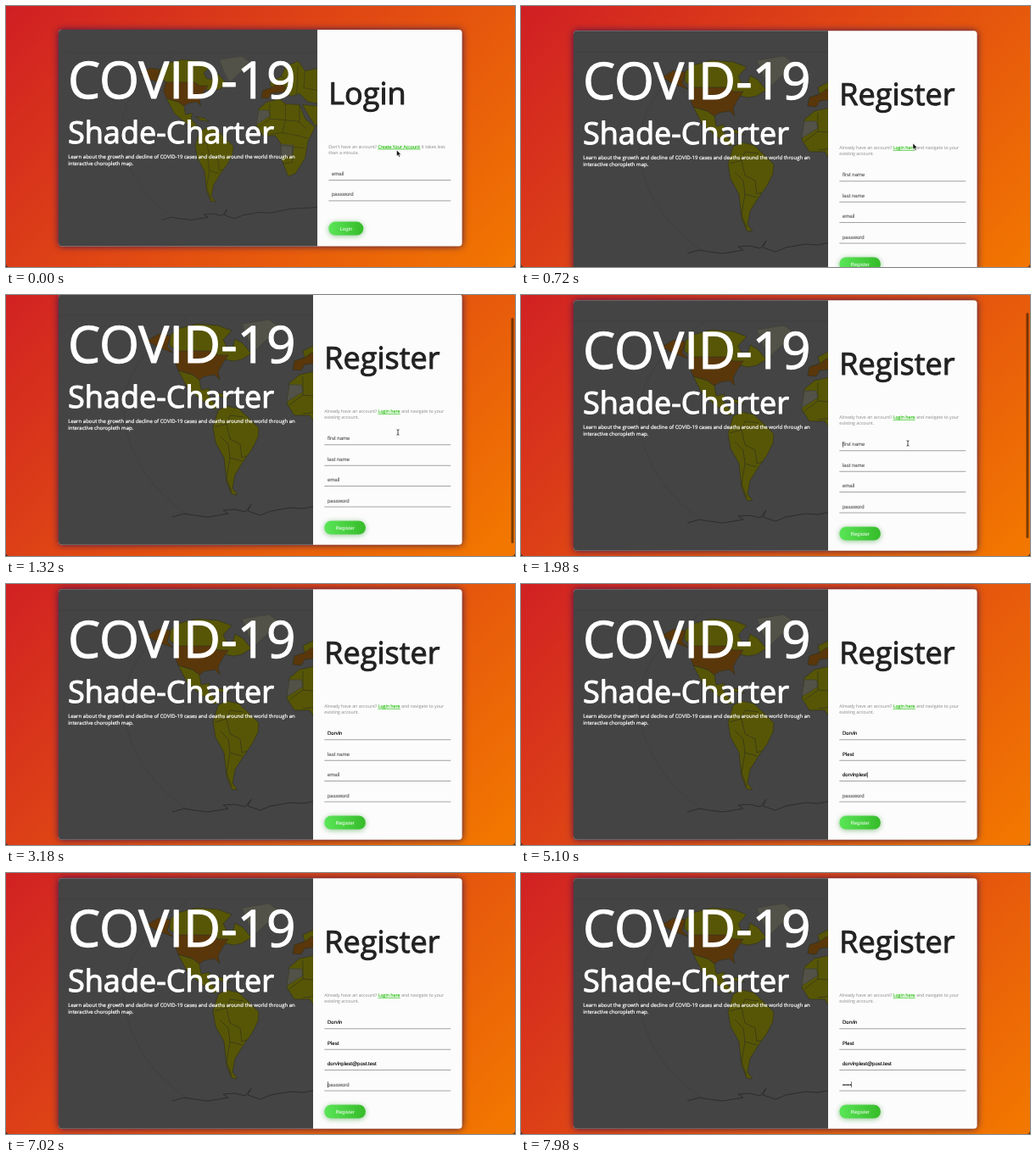
An HTML page that plays this animation: 600 px wide and 308 px high, repeating every 8000 ms.

```html
<!DOCTYPE html>
<html lang="en">
<head>
<meta charset="utf-8">
<title>Register</title>
<style>
  html, body { margin: 0; width: 100%; height: 100%; overflow: hidden; background: #3a2420; }
  svg { display: block; width: 600px; height: 308px; text-rendering: geometricPrecision; }
  text { font-family: "Open Sans", sans-serif; white-space: pre; stroke-linejoin: round; }
  .white { fill: #fff; stroke: #fff; stroke-width: .2px; }
  .big { stroke-width: 1.1px; }
  .head { fill: #222; stroke: #222; stroke-width: 1px; font-size: 36px; }
  .note { fill: #999; stroke: #999; stroke-width: .08px; font-size: 5.25px; }
  .link { fill: #35c31f; stroke: #35c31f; stroke-width: .2px; text-decoration: underline; }
  .field, .label { font-family: "Liberation Sans", Arial, sans-serif; font-size: 6px; }
  .field { stroke-width: .12px; }
  .placeholder { fill: #5c5c5c; stroke: #5c5c5c; }
  .typed { fill: #000; stroke: #000; }
  .label { fill: #fff; text-anchor: middle; }
  .card { filter: drop-shadow(0 0 4.5px rgba(48, 22, 82, .95)); }
  .button { filter: drop-shadow(0 1.5px 3px rgba(50, 150, 50, .55)); }
</style>
</head>
<body>
<svg id="stage" viewBox="0 0 600 308">
  <defs>
    <linearGradient id="sky" gradientUnits="userSpaceOnUse" x1="73" y1="-73" x2="527" y2="381">
      <stop offset="0" stop-color="#d01f24"/><stop offset="1" stop-color="#f27700"/>
    </linearGradient>
    <linearGradient id="green">
      <stop offset="0" stop-color="#5ae658"/><stop offset="1" stop-color="#36bb29"/>
    </linearGradient>
    <clipPath id="window"><path d="M0 0H600V304Q600 308 596 308H4Q0 308 0 304Z"/></clipPath>
    <g id="map" stroke="#333320" stroke-width=".7" stroke-linejoin="round">
      <g fill="none" stroke="#3d3d3d">
        <path d="M60 54H460M215 56Q130 110 140 180Q150 245 215 290M481 56Q566 110 556 180Q546 245 481 290"/>
        <path stroke="#2c2c2c" stroke-width="1" d="M196 292L210 288 222 290 238 292 262 288 256 284 270 283 282 286 289 277 285 285 300 290 312 285 335 281 350 282 380 276 417 274 440 275"/>
      </g>
      <g fill="#575606">
        <path d="M193 78L202 70 225 64 250 66 266 72 256 83 260 91 267 92 270 82 279 87 289 99 278 106 268 108 258 106 250 101 243 97H205L193 90Z"/>
        <path d="M203 119L220 124 228 130 230 142 240 140 238 148 250 163 246 165 228 152 214 140Z"/>
        <path d="M250 166L260 161 274 164 286 175 298 187 297 198 290 212 280 226 270 242 267 258 273 266 266 265 260 250 257 222 247 204 244 186Z"/>
        <path d="M334 134L346 124 364 120 372 127 392 128 400 148 414 160 404 180 400 204 386 226 376 230 366 204V184L358 172H340L331 158Z"/>
        <path d="M338 118L340 108 352 104 350 96 366 88 372 74 390 66 400 80 430 74V128L404 124 392 112 380 116 370 108 352 112Z"/>
        <path d="M396 128L418 130 428 150 414 158Z"/>
        <path d="M244 145L256 147 264 152 252 150Z"/>
      </g>
      <g fill="#5a370b">
        <path d="M166 84L180 76 194 78 190 91 197 98 180 92Z"/>
        <path d="M202 96H243L250 101 262 101 254 113 250 121 252 130 246 124 234 126 228 130 220 124 203 119 199 108Z"/>
        <path d="M338 118L340 108 352 104 360 98 372 102 370 110 352 112 348 119Z"/>
      </g>
      <g fill="#525248" stroke="#404038">
        <path d="M278 64L310 59 322 68 308 82 293 96 286 84Z"/>
        <path d="M334 136L348 136 350 144 331 156ZM366 184L384 186 382 200 366 202Z"/>
      </g>
      <path fill="none" d="M246 186L260 182 264 172 280 174M260 182L264 200 276 206 278 222 284 220M252 196L262 206 264 222 260 246 266 262M264 222L278 226M350 126V148L334 160M372 127V150L392 152M392 128V154L402 162M350 148L372 150 368 168 350 170M368 168L390 172 404 176M366 186L384 188 400 190M382 188V210L368 212M366 88L380 96 372 106M390 72L388 112M400 80L398 104 430 110"/>
    </g>
  </defs>
  <rect width="600" height="308" fill="#3a2420"/>
  <g clip-path="url(#window)">
    <g id="page"><rect width="600" height="360" fill="url(#sky)"/></g>
    <rect id="thumb" x="595.5" width="3" height="266" rx="1.5" fill="#301800"/>
  </g>
  <path id="arrow" d="M0 0V7.2L1.7 5.7 2.9 8.3 4.1 7.8 3 5.2H5.2Z" fill="#111" stroke="#fff" stroke-width=".5"/>
  <path id="beam" d="M-1.5 -3.2Q0 -3.2 0 -2.2Q0 -3.2 1.5 -3.2M0 -2.5V2.5M-1.5 3.2Q0 3.2 0 2.2Q0 3.2 1.5 3.2" fill="none" stroke="#222" stroke-width=".8"/>
</svg>
<script>
const LOOP = 8000, SWITCH = 520, ROW = 24.4;
const $ = id => document.getElementById(id);

function add(parent, tag, attrs = {}, content = '') {
  const el = document.createElementNS('http://www.w3.org/2000/svg', tag);
  for (const key in attrs) el.setAttribute(key, attrs[key]);
  el.textContent = content;
  parent.append(el);
  return el;
}

function buildScreen({ id, top, height, split, title, note, fields, button, mapTransform }) {
  const root = add($('page'), 'g');
  const x = split + 13.3, bottom = top + height;
  const write = (cls, tx, dy, content, size) =>
    add(root, 'text', { class: cls, x: tx, y: top + dy, ...(size && { 'font-size': size }) }, content);

  add(root, 'rect', { class: 'card', x: 62, y: top, width: 475.6, height, rx: 4, fill: '#fcfcfc' });
  const left = `M${split} ${top}H66Q62 ${top} 62 ${top + 4}V${bottom - 4}Q62 ${bottom} 66 ${bottom}H${split}Z`;
  add(root, 'path', { d: left, fill: '#444' });
  add(add(root, 'clipPath', { id }), 'path', { d: left });
  const clip = add(root, 'g', { 'clip-path': `url(#${id})` });
  add(clip, 'use', { href: '#map', transform: mapTransform });

  write('white big', 73, 80.7, 'COVID-19', 60.4);
  write('white big', 73, 134, 'Shade-Charter', 36);
  write('white', 73.3, 151.6, 'Learn about the growth and decline of COVID-19 cases and deaths around the world through an', 6);
  write('white', 73.3, 159.7, 'interactive choropleth map.', 6);
  write('head', x, 88, title);

  const line = write('note', x, 139.7, '');
  note[0].forEach((part, i) => add(line, 'tspan', i === 1 ? { class: 'link' } : {}, part));
  write('note', x, 146.9, note[1]);

  const inputs = fields.map((name, i) => {
    const dy = 172 + i * ROW;
    add(root, 'rect', { x, y: top + dy + 5.1, width: 524.3 - x, height: .8, fill: '#8c8c8c' });
    return { name, y: top + dy, el: write('field placeholder', x + 3.7, dy, name) };
  });

  const mid = top + button.dy;
  add(root, 'rect', { class: 'button', x, y: mid - 8, width: button.width, height: 16, rx: 8, fill: 'url(#green)' });
  add(root, 'text', { class: 'label', x: x + button.width / 2, y: mid + 2 }, title);
  return { root, inputs, textX: x + 3.7 };
}

const login = buildScreen({
  id: 'loginMap', top: 28, height: 255.6, split: 367, title: 'Login',
  note: [["Don't have an account? ", 'Create Your Account', ' It takes less'], 'than a minute.'],
  fields: ['email', 'password'], button: { dy: 234.6, width: 41 },
  mapTransform: 'matrix(.83 0 0 .83 20.6 10.2)'
});
const register = buildScreen({
  id: 'registerMap', top: 29.3, height: 295.5, split: 362, title: 'Register',
  note: [['Already have an account? ', 'Login here', ' and navigate to your'], 'existing account.'],
  fields: ['first name', 'last name', 'email', 'password'], button: { dy: 275.2, width: 48.6 },
  mapTransform: 'translate(0 0)'
});
const caret = add(register.root, 'rect', { width: .5, height: 7, fill: '#000' });

// Each run types its characters evenly from start to end.
const typing = [
  { field: 0, text: 'Dorvin', start: 2100, end: 2650 },
  { field: 1, text: 'Plest', start: 3480, end: 4000 },
  { field: 2, text: 'dorvinplest', start: 4260, end: 5060 },
  { field: 2, text: '@post.t', start: 5280, end: 6030 },
  { field: 2, text: 'est', start: 6180, end: 6480 },
  { field: 3, text: '•••••', start: 7080, end: 7860 }
];
const focusTimes = [1860, 3360, 4140, 6840];

const scrollKeys = [[900, 0], [1240, 30], [1400, 30], [1740, 23]];
const cursorX = [[120, 460.5], [420, 462], [1700, 462], [1840, 456]];
const cursorY = [[120, 170], [420, 162], [1700, 162], [1840, 175]];

function track(keys, t) {
  if (t <= keys[0][0]) return keys[0][1];
  for (let i = 1; i < keys.length; i++) {
    const [t0, a] = keys[i - 1], [t1, b] = keys[i];
    if (t < t1) {
      const p = (t - t0) / (t1 - t0);
      return a + (b - a) * p * p * (3 - 2 * p);
    }
  }
  return keys[keys.length - 1][1];
}

const show = (el, visible) => el.setAttribute('visibility', visible ? 'visible' : 'hidden');

function updateForm(t) {
  const values = ['', '', '', ''];
  let lastKey = 0;
  for (const { field, text, start, end } of typing) {
    if (t < start) continue;
    const step = (end - start) / (text.length - 1);
    const count = Math.min(text.length, Math.floor((t - start) / step + 1e-6) + 1);
    values[field] += text.slice(0, count);
    lastKey = start + (count - 1) * step;
  }
  register.inputs.forEach(({ el, name }, i) => {
    el.textContent = values[i] || name;
    el.setAttribute('class', values[i] ? 'field typed' : 'field placeholder');
  });
  const focus = focusTimes.filter(time => t >= time).length - 1;
  const idle = t - Math.max(lastKey, focusTimes[focus] || 0);
  show(caret, focus >= 0 && idle % 1000 < 500);
  if (focus < 0) return;
  const { el, y } = register.inputs[focus];
  caret.setAttribute('x', register.textX + (values[focus] ? el.getComputedTextLength() : 0));
  caret.setAttribute('y', y - 5.4);
}

function draw(t) {
  const registering = t >= SWITCH;
  login.root.style.display = registering ? 'none' : '';
  register.root.style.display = registering ? '' : 'none';
  if (registering) updateForm(t);

  const scroll = track(scrollKeys, t);
  $('page').setAttribute('transform', `translate(0 ${-scroll})`);
  $('thumb').setAttribute('y', 1 + scroll * .87);
  $('thumb').setAttribute('opacity', t < 900 ? 0 : .6 * track([[2200, 1], [2460, 0]], t));

  const place = `translate(${track(cursorX, t)} ${track(cursorY, t)})`;
  for (const id of ['arrow', 'beam']) $(id).setAttribute('transform', place);
  show($('arrow'), t < 1080);
  show($('beam'), t >= 1080 && t < 2100);
}

const began = performance.now();
function tick() {
  draw((performance.now() - began) % LOOP);
  requestAnimationFrame(tick);
}
tick();
</script>
</body>
</html>
```
